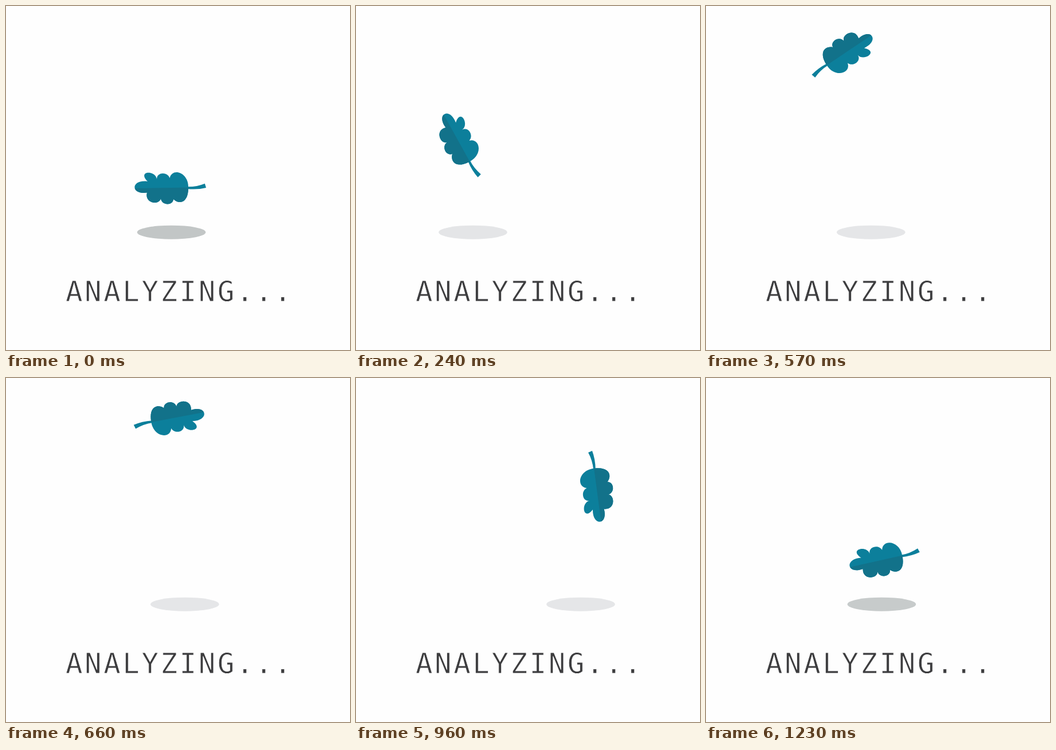
An HTML page that plays this animation: 600 px wide and 600 px high, repeating every 1.26 s.

```html
<!DOCTYPE html>
<html lang="en">
<head>
<meta charset="utf-8">
<title>Analyzing</title>
<style>
  html, body { margin: 0; width: 100%; height: 100%; overflow: hidden; background: #fefefe; }
  svg { display: block; width: 100%; height: 100%; }
  /* the thin background-coloured stroke makes the letters lighter */
  text {
    font: 49px "DejaVu Sans Mono", monospace; letter-spacing: 3.6px;
    fill: #3d3d3f; stroke: #fefefe; stroke-width: .8px;
  }
</style>
</head>
<body>
<svg viewBox="0 0 600 600">
  <defs>
    <!-- one curve per lobe, counterclockwise from the stem -->
    <path id="body" d="M318 317
      C319 290 290 281 285.5 300
      C282 289 263 289 263 302
      C261 286 228 287 247 306
      C217 302 217 330 246 325.5
      C241 345 268 348 270 335.5
      C271 348 291 349 292 337
      C301 346 318 345 318 317Z"/>
    <clipPath id="half"><path d="M222 318L320 316.5V350H222Z"/></clipPath>
  </defs>
  <ellipse id="shadow" cy="394.7" rx="59.8" ry="12"/>
  <g id="leaf" fill="#0c7f9b">
    <path d="M316 315.3Q332 315.8 346.8 309.8L349 317Q334 320.8 316 319Z"/>
    <use href="#body"/>
    <use href="#body" fill="#12728a" clip-path="url(#half)"/>
  </g>
  <text x="104" y="515.4">ANALYZING...</text>
</svg>
<script>
  const LOOP = 1260, STEP = 30;
  const CYCLE = 1267;                  // the swing is cut slightly short by the loop
  const LEFT = 247, RIGHT = 1020;      // when the shadow turns back
  const TOP = 685;                     // when the leaf starts to fall faster

  const leaf = document.getElementById("leaf");
  const shadow = document.getElementById("shadow");

  // Progress from 0 to 1 between two times
  const span = (t, from, to) => Math.min(1, Math.max(0, (t - from) / (to - from)));

  function draw(t) {
    const out = span(t, 0, LEFT);
    const across = span(t, LEFT, RIGHT);
    const back = span(t, RIGHT, CYCLE);
    const angle = 176.6 * span(t, 0, TOP) + 183.4 * span(t, TOP, CYCLE);
    const dark = 1 - out + back;

    leaf.setAttribute("transform", `rotate(${angle} 296 194)`);
    shadow.setAttribute("cx", 288.5 - 87 * out + 206.5 * across - 119.5 * back);
    shadow.setAttribute("fill", `rgb(${229 - 35 * dark}, ${230 - 32 * dark}, ${232 - 34 * dark})`);
  }

  let start = null;
  function tick(now) {
    start ??= now;
    const t = (now - start) % LOOP;
    draw(Math.floor(t / STEP) * STEP);
    requestAnimationFrame(tick);
  }
  draw(0);
  requestAnimationFrame(tick);
</script>
</body>
</html>
```
